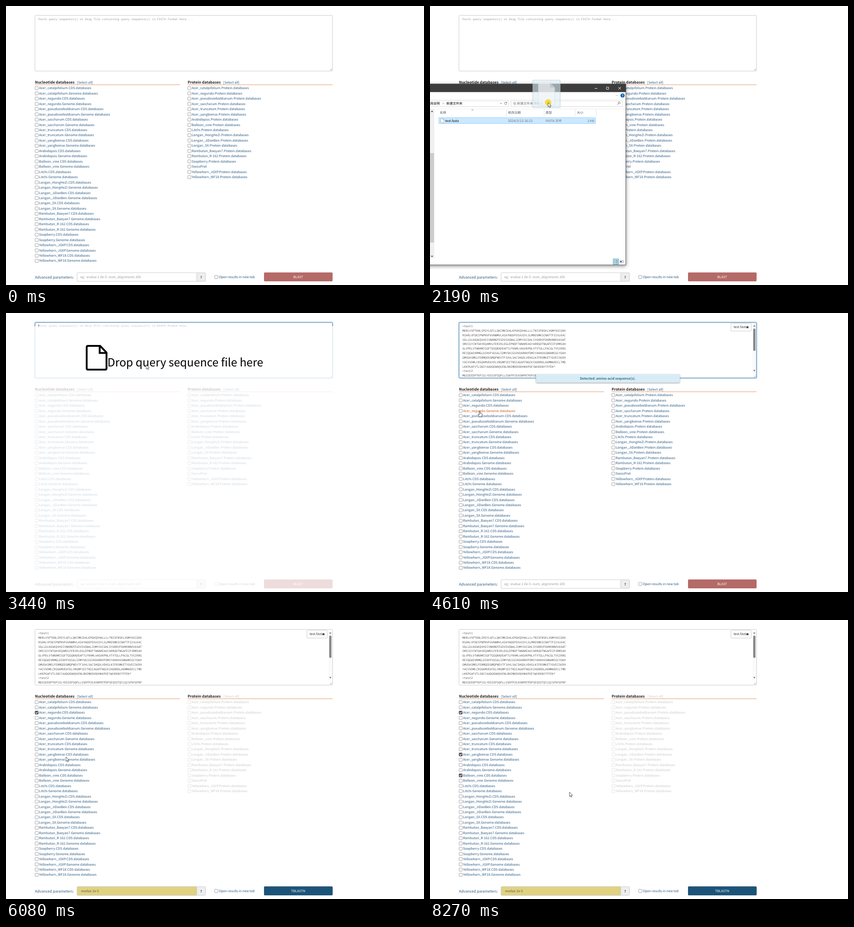
Recreate the animation shown at these times as an HTML page. Size 917 px wide and 611 px high, loop 8.35 s.

```html
<!DOCTYPE html>
<html lang="zh-CN">
<head>
<meta charset="utf-8">
<title>Sequence search</title>
<style>
html, body { margin: 0; width: 100%; height: 100%; overflow: hidden; background: #fff; }
svg { display: block; width: 917px; height: 611px; }
text {
  font-family: 'Noto Sans CJK SC', 'Noto Sans CJK JP', 'Noto Sans CJK', sans-serif;
  font-size: 7.19px; text-rendering: geometricPrecision; white-space: pre;
}
.mono { font-family: 'Noto Sans Mono', 'DejaVu Sans Mono', monospace; font-size: 6.305px; }
.title { font-size: 8.21px; font-weight: 700; fill: #222; }
.label { font-size: 8.21px; fill: #36597a; }
.link { fill: #2b587f; }
.hot { fill: #cf571f; }
.box { fill: #fff; stroke: #767676; stroke-width: .7; }
.field { fill: #fff; stroke: #ccc; }
.button { font-weight: 500; fill: #fff; text-anchor: middle; }
.rule { stroke: #e59a74; }
.files text { font-size: 7px; }
.thin { fill: none; stroke: #555; stroke-width: .8; }
.grey { fill: #6d6d6d; }

/* One loop is 8350 ms; every animation shares it. */
.a { animation: 8350ms step-end infinite; }
#win { animation-name: win; }
#overlay { animation-name: overlay; }
#hint { animation-name: hint; }
#seq { animation-name: seq; }
#focus { animation-name: focus; }
#caret { animation-name: caret; }
#note { animation-name: note; animation-timing-function: ease-out; }
#picked, #check2 { animation-name: picked; }
#check10 { animation-name: check10; }
#check14 { animation-name: check14; }
#protein { animation-name: dim; }
#ghost { animation-name: ghost; }
#press { animation-name: press; }
#cursor { animation-name: move; animation-timing-function: linear; }
#hand, .hand #arrow { display: none; }
.hand #hand { display: inline; }

@keyframes win { 0% { opacity: 0 } 5.5% { opacity: 1 } 40.35% { opacity: 0 } }
@keyframes overlay { 0% { opacity: 0 } 28.97% { opacity: 1 } 42.15% { opacity: 0 } }
@keyframes hint { 0% { opacity: 1 } 43.1% { opacity: 0 } }
@keyframes seq { 0% { opacity: 0 } 43.1% { opacity: 1 } }
@keyframes focus { 0% { opacity: 0 } 40.35% { opacity: 1 } 62.15% { opacity: 0 } }
@keyframes caret { 0% { opacity: 0 } 40.35% { opacity: 1 } 43.1% { opacity: 0 } }
@keyframes note {
  0%, 43.1% { opacity: 0; transform: translateY(-19px) }
  45.98%, 64.07% { opacity: 1; transform: none }
  68%, 100% { opacity: 0; transform: translateY(-19px) }
}
@keyframes picked { 0% { opacity: 0 } 64.07% { opacity: 1 } }
@keyframes check10 { 0% { opacity: 0 } 77.6% { opacity: 1 } }
@keyframes check14 { 0% { opacity: 0 } 93.52% { opacity: 1 } }
@keyframes dim { 0% { filter: none } 64.07% { filter: grayscale(1) opacity(.3) } }
@keyframes ghost { 0% { opacity: 0 } 19.64% { opacity: 1 } 40.35% { opacity: 0 } }
@keyframes press {
  0% { opacity: 0 } 17.72% { opacity: .85 } 40.35% { opacity: 0 }
  62.15% { opacity: .85 } 64.07% { opacity: 0 }
  75.4% { opacity: .85 } 77% { opacity: 0 }
  89.7% { opacity: .85 } 91.6% { opacity: 0 }
}
@keyframes move {
  0%, 5.51% { transform: translate(-12px, 330px) }
  9.58% { transform: translate(36px, 280px) }
  12.81% { transform: translate(60.5px, 253px) }
  14.73%, 17.72% { transform: translate(54px, 250px) }
  19.64% { transform: translate(82px, 246px) }
  22.75% { transform: translate(160px, 232px) }
  26.23% { transform: translate(259px, 211.5px) }
  27.19% { transform: translate(270px, 200px) }
  28.02% { transform: translate(280px, 185px) }
  31.14% { transform: translate(303px, 140px) }
  35.57%, 40.36% { transform: translate(308px, 117px) }
  41.2% { transform: translate(307.5px, 113px) }
  45.99%, 47.66% { transform: translate(303px, 108px) }
  50.54% { transform: translate(230px, 168px) }
  53.41% { transform: translate(133px, 232px) }
  55.21% { transform: translate(109px, 215.5px) }
  58.2% { transform: translate(114px, 208px) }
  59.16%, 64.07% { transform: translate(115px, 207px) }
  71.14%, 73.89% { transform: translate(131.5px, 300px) }
  74.85%, 77.6% { transform: translate(131px, 297px) }
  81.2% { transform: translate(131px, 366px) }
  83.23%, 84.43% { transform: translate(131px, 382px) }
  88.02%, 92.57% { transform: translate(131px, 345px) }
  99.04%, 100% { transform: translate(306px, 377px) }
}
</style>
</head>
<body>
<svg viewBox="0 0 917 611">
  <!-- Query box -->
  <rect class="field" x="63.5" y="20.5" width="653" height="122" rx="2"/>
  <text id="hint" class="a mono" x="71" y="31.1" fill="#999">Paste query sequence(s) or drag file containing query sequence(s) in FASTA format here ...</text>
  <path id="caret" class="a" d="M71.5 25V33" stroke="#222" stroke-width=".7"/>
  <g id="seq" class="a">
    <g id="lines" fill="#555"></g>
    <rect x="707.5" y="22" width="8" height="110" fill="#fafafa"/>
    <rect x="709" y="34" width="5" height="49" rx="2.5" fill="#8b8b8b"/>
    <path d="M709 29.8H714L711.500 26.300ZM709 124.800H714L711.500 128.300Z" fill="#7d7d7d"/>
    <rect class="field" x="660" y="22.500" width="45" height="17" rx="2"/>
    <text x="666" y="33.300" font-size="7" fill="#333">test.fasta</text>
    <path d="M694.800 29.200L698.600 33M698.600 29.200L694.800 33" stroke="#222" stroke-width="1.500"/>
  </g>
  <path d="M711 141L715 137M713.500 141L715 139.500" stroke="#777" stroke-width=".7"/>
  <rect id="focus" class="a" x="63.5" y="20.5" width="653" height="122" rx="2" fill="none" stroke="#4a82a9" style="filter:drop-shadow(0 0 1.500px #7fb2d8)"/>

  <!-- Database lists -->
  <text class="title" x="63.5" y="170">Nucleotide databases</text>
  <text class="link" x="155.5" y="169.8">[Select all]</text>
  <text class="title" x="398.500" y="170">Protein databases</text>
  <path class="rule" d="M63.500 172.500H381.500M398.500 172.500H716.500"/>
  <g id="nucleotide"></g>
  <g id="protein" class="a"><text class="link" x="476.800" y="169.800">[Select all]</text></g>

  <!-- Options -->
  <text class="label" x="63.500" y="597">Advanced parameters:</text>
  <rect class="field" x="156" y="584" width="263" height="19" rx="2"/>
  <text x="163" y="596.200" fill="#999">eg: -evalue 1.0e-5 -num_alignments 100</text>
  <rect x="566" y="583.500" width="150.500" height="19.500" rx="2" fill="#b46a67"/>
  <text class="button" x="641" y="596.200">BLAST</text>
  <g id="picked" class="a">
    <rect x="156" y="584" width="263" height="19" rx="2" fill="#e0d27f" stroke="#ccc"/>
    <text x="163" y="596.200" fill="#555">-evalue 1e-5</text>
    <rect x="566" y="583.500" width="150.500" height="19.500" rx="2" fill="#1c5479"/>
    <text class="button" x="641" y="596.200">TBLASTN</text>
  </g>
  <rect x="418.500" y="584" width="19" height="19" rx="2" fill="#eee" stroke="#ccc"/>
  <text x="428" y="596.500" font-weight="700" fill="#333" text-anchor="middle">?</text>
  <rect class="box" x="457.800" y="589.900" width="7" height="7" rx="1.400"/>
  <text class="link" x="467" y="596.200">Open results in new tab</text>

  <g id="note" class="a">
    <rect x="232.500" y="134" width="315.500" height="18.500" rx="2" fill="#d9ecf5" style="filter:drop-shadow(0 1px 1.500px #0006)"/>
    <text x="390" y="145.600" font-weight="700" fill="#31708f" text-anchor="middle">Detected: amino-acid sequence(s).</text>
  </g>

  <g id="overlay" class="a">
    <rect y="29" width="917" height="582" fill="#fff" opacity=".77"/>
    <path d="M180 72H206.500L220.500 86.500V121Q220.500 124 217.500 124H180Q177 124 177 121V75Q177 72 180 72ZM205.500 73V87.500H220" fill="none" stroke="#000" stroke-width="4"/>
    <text x="222.500" y="117" style="font-size:24.600px">Drop query sequence file here</text>
  </g>

  <!-- File window -->
  <g id="win" class="a files">
    <rect x="-20" y="171" width="449.500" height="396" fill="#fff" stroke="#5a5a5a" style="filter:drop-shadow(0 2px 4px #0007)"/>
    <rect x="-20" y="170.500" width="450" height="18" fill="#3c3c3c"/>
    <path d="M361 180.500H367M387 177.500H392V182.500H387ZM413 177L419 183M419 177L413 183" fill="none" stroke="#fff" stroke-width=".9"/>
    <path class="thin" d="M408 195L410 197L412 195" style="stroke:#999"/>
    <circle cx="422.500" cy="196" r="4.600" fill="#0b63ad"/>
    <text x="422.500" y="198.600" fill="#fff" font-weight="700" text-anchor="middle">?</text>
    <path d="M0 204.500H429M0 225.500H429" stroke="#ececec"/>
    <rect x="-10" y="207.500" width="182.500" height="13" fill="#fff" stroke="#d9d9d9"/>
    <rect x="177.500" y="207.500" width="244.500" height="13" fill="#fff" stroke="#d9d9d9"/>
    <text x="-6.500" y="215.800">使用说明</text>
    <path class="thin" d="M28 211.500L29.800 213.300L28 215.100M153.500 212L155.700 214.200L157.900 212"/>
    <text x="36" y="215.800">新建文件夹</text>
    <path class="thin" d="M168 211.800A2.600 2.600 0 1 0 168.300 214M168.500 210V212.200H166.300"/>
    <text x="182.500" y="215.800" class="grey">在 新建文件夹 中搜索</text>
    <path class="thin" d="M413.500 213.600L411 216.200"/>
    <circle class="thin" cx="415" cy="212" r="2.100"/>
    <rect y="226" width="9.500" height="327" fill="#f0f0f0"/>
    <rect y="322" width="9" height="196" fill="#cdcdcd"/>
    <path class="thin" d="M2.500 232L4.500 230L6.500 232M2.500 547L4.500 549L6.500 547" style="stroke:#333;stroke-width:1.100"/>
    <path d="M167.500 226V242M250.500 226V242M318.500 226V242M364.500 226V242" stroke="#e5e5e5"/>
    <path class="thin" d="M91 228.500L93 226.700L95 228.500"/>
    <g fill="#44546a">
      <text x="21.500" y="236">名称</text><text x="171" y="236">修改日期</text>
      <text x="253.500" y="236">类型</text><text x="322.500" y="236">大小</text>
    </g>
    <rect x="19.500" y="244.500" width="343.500" height="13" fill="#cce8ff" stroke="#99d1ff"/>
    <path d="M23.500 246.500H28L30.500 249V255.800H23.500ZM28 246.500V249H30.500" fill="#fff" stroke="#999" stroke-width=".7"/>
    <text x="33.500" y="253.600">test.fasta</text>
    <g class="grey">
      <text x="171" y="253.600" style="font-size:7.300px">2024/3/13 16:23</text>
      <text x="253.500" y="253.600">FASTA 文件</text>
      <text x="360" y="253.600" text-anchor="end">2 KB</text>
    </g>
    <rect x="402" y="554" width="11.500" height="11.500" fill="#cce8f6" stroke="#3f9ac4"/>
    <path d="M404 557H406M404 559.700H406M404 562.400H406M407 557H412M407 559.700H412M407 562.400H412" stroke="#567"/>
    <rect x="416.500" y="557" width="8" height="5.500" fill="#dde6ee" stroke="#9ab" stroke-width=".7"/>
    <rect x="417.500" y="558.500" width="3" height="2.500" fill="#345"/>
  </g>

  <g id="cursor" class="a">
    <g id="ghost" class="a">
      <rect x="-33.500" y="-49" width="60" height="60" rx="1" fill="#dcedf6" fill-opacity=".6" stroke="#a9c9da" stroke-opacity=".8"/>
      <path d="M-21.500 -43.500H4L14.500 -33V6.500H-21.500Z" fill="#f4f6f7" fill-opacity=".65" stroke="#cdd5d9" stroke-width=".6"/>
      <path d="M4 -43.500V-33H14.500Z" fill="#b9c3c9" fill-opacity=".8"/>
    </g>
    <circle id="press" class="a" r="7" fill="#f2d815"/>
    <path id="arrow" d="M0 0V9.600L2.200 7.600L3.700 11L5.200 10.400L3.800 7.100H6.800Z" fill="#fff" stroke="#111" stroke-width=".7"/>
    <path id="hand" d="M-1 -.3Q0 -1.300 1 -.3V4L4.600 4.800Q5.600 5.200 5.500 6.400L4.600 11.800H-1L-4 7.400Q-3.600 5.800 -2.400 6.600L-1 7.800Z" fill="#fff" stroke="#111" stroke-width=".8"/>
  </g>
</svg>
<script>
const $ = id => document.getElementById(id);

function add(parent, tag, attrs, text = '') {
  const node = document.createElementNS('http://www.w3.org/2000/svg', tag);
  for (const key in attrs) node.setAttribute(key, attrs[key]);
  node.textContent = text;
  return parent.appendChild(node);
}

const species = [
  ...['catalpifolium', 'negundo', 'pseudosieboldianum', 'saccharum', 'truncatum', 'yangbiense'].map(s => 'Acer_' + s),
  'Arabidopsis', 'Balloon_vine', 'Litchi', 'Longan_HongHeZi', 'Longan_JiDanBen', 'Longan_SX',
  'Rambutan_Baoyan7', 'Rambutan_R-162', 'Soapberry', 'Yellowhorn_JGXP', 'Yellowhorn_WF18'
];
const nucleotide = species.flatMap(s => [`${s}.CDS.databases`, `${s}.Genome.databases`]);
const protein = species.map(s => `${s}.Protein.databases`);
protein.splice(15, 0, 'SwissProt');

const rowY = i => 179.9 + 11.46 * i;

function addRow(group, x, name, i) {
  const y = rowY(i);
  add(group, 'rect', { class: 'box', x: x + .3, y: y - 3.5, width: 7, height: 7, rx: 1.4 });
  const text = add(group, 'text', { class: 'link', x: x + 9, y: y + 2.4 }, name);
  return { y, text, right: x + 9 + text.getComputedTextLength() };
}

const rows = nucleotide.map((name, i) => addRow($('nucleotide'), 63.5, name, i));
protein.forEach((name, i) => addRow($('protein'), 398.5, name, i));

for (const i of [2, 10, 14]) {
  const mark = add($('nucleotide'), 'g', { id: 'check' + i, class: 'a' });
  const y = rowY(i);
  add(mark, 'rect', { x: 63.5, y: y - 3.8, width: 7.6, height: 7.6, rx: 1.4, fill: '#55525c' });
  add(mark, 'path', { d: `M65 ${y}l1.700 1.800l3 -3.700`, fill: 'none', stroke: '#fff', 'stroke-width': 1.1 });
}

`>test1
MKRLVSPTKNLSPGYLGFLLQKCMKCKALKPGKQVHALLLLTNISFNSKLVGMYASCGNV
RSARLVFDEIPNPNVFAVNWMVLASAYNGDFEEAIGYLSLMRDSMKSCNKFTFSIVLKAC
VGLLDLKKGKQVHSIVNKMGFESDVSVGNALIDMYCKCGHLSYGRRVFDKMVNRDVASWT
SMICGYCNTGKVEQAMVLFERIRLEGLEPNDFTWNAMIAGYARRGDTNGAFEIFSRMSAH
GLVPDLVTWNAMISGFTQSQRADEAFTLFRAMLVAGVKPNLVTVTGLLPACGLTVSIRRG
REIQGWIHRMGLDINVFVGSALIDMYSKCGSVKDARNVFDMIYAKNVASWNAMIGCYGKH
GMVDASMELFERMQEEGMQPNEVTFIAVLSACSHGDLVEKGLKIFRSMKETYGVEISKEH
YACVVDMLCRSGKMVEAYELVRGMPIEITNSIAGAFFNGCKIHGRRDLAKMMAEECLTMD
LKKPGAFVTLSNIYAADGEWHQVENLRNIMKEKNVHKKPGFSWVEKNVTFFEK*
>test2
MGSSEEDPTKPISLYDSSSPSQPLLSSKPPIEASNPNTPDPSESDSTQYLQISFNYGPRP`
  .split('\n')
  .forEach((line, i) => add($('lines'), 'text', { class: 'mono', x: 71, y: 31.1 + 9.83 * i }, line));

// Hover follows from where the animated cursor is.
const cursor = $('cursor');
const cursorStyle = getComputedStyle(cursor);
const winStyle = getComputedStyle($('win'));

function hover() {
  const { e: x, f: y } = new DOMMatrix(cursorStyle.transform);
  const covered = winStyle.opacity !== '0';
  const hit = !covered && rows.find(r => Math.abs(y - r.y) < 5 && x > 63 && x < r.right);
  for (const r of rows) r.text.classList.toggle('hot', r === hit);
  cursor.classList.toggle('hand', !!hit);
  requestAnimationFrame(hover);
}
hover();
</script>
</body>
</html>
```
